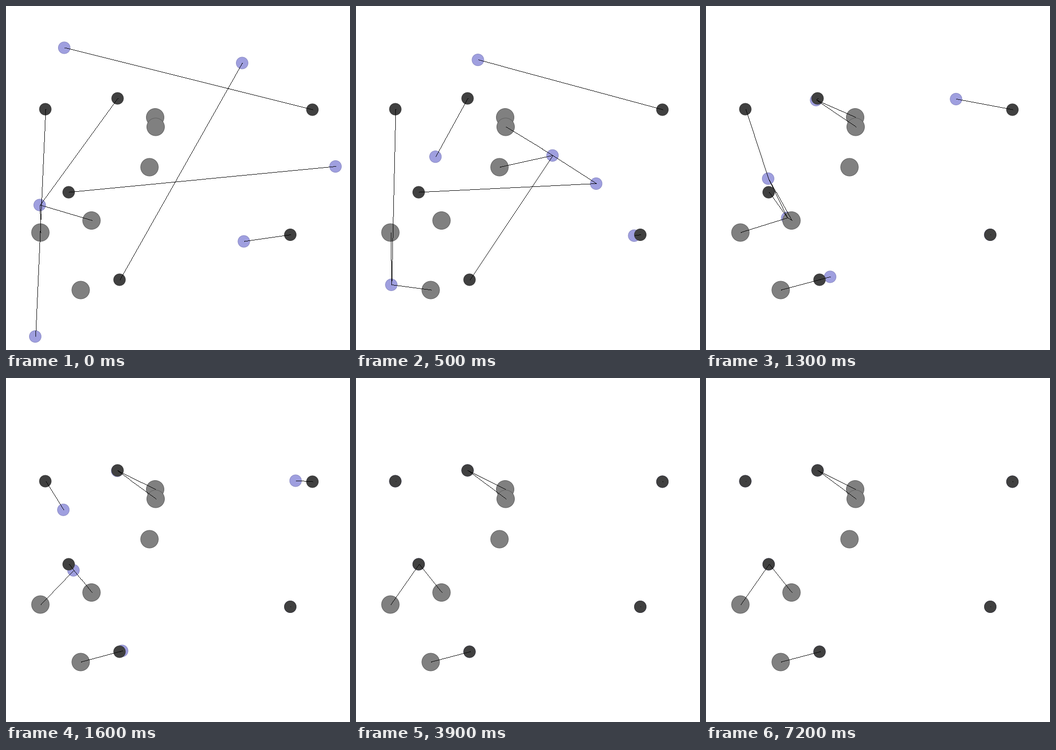
Recreate the animation shown at these times as a matplotlib script. Size 700 by 700 pixels, loop 7.4 s.

```python
import numpy as np
import matplotlib.pyplot as plt
from itertools import combinations
from matplotlib.animation import FuncAnimation
from matplotlib.patches import Circle

SIZE, DPI = 700, 100
FRAMES, STEP = 74, 100      # loop of 7400 ms
PX = 72 / DPI               # one pixel in points
SIGHT = 123                 # neighbours closer than this are linked
PICKUP, ARRIVE = 0.45, 0.36  # easing into cruise speed and onto the goal
BENDS = np.array([0, 0.3, 0.6, 0.9, 1])

# Points are complex numbers: x + y j.
OBSTACLES = [303.5 + 226.5j, 304.5 + 246j, 292 + 328j,
             174 + 436.5j, 70 + 461j, 152 + 578j]

# start, goal, cruise speed per step, sideways swerve at the inner bends
AGENTS = [
    (118.5 + 85j, 623.5 + 211j, 34.3, (-8, 3, 8)),
    (480.5 + 116j, 231 + 557j, 53, (-16, -34, -42)),
    (670.5 + 326.5j, 127.5 + 379j, 48, (-16, -25, -75)),
    (484 + 479j, 578.5 + 465.5j, 45, (0, 0, 0)),
    (68.5 + 405j, 227 + 188j, 35, (13, 18, -2)),
    (59.5 + 672.5j, 80 + 210j, 27.5, (12, 55, 37)),
]


def smooth(x, y, at):
    """Monotone cubic curve through the points (x, y)."""
    gap = np.diff(x)
    slope = np.diff(y) / gap
    tan = np.concatenate([[0], slope[-1:].repeat(len(x) - 1)])
    for i, (a, b) in enumerate(zip(slope, slope[1:]), 1):
        tan[i] = 2 * a * b / (a + b) if a * b > 0 else 0
    i = np.clip(np.searchsorted(x, at, side="right") - 1, 0, len(gap) - 1)
    h = gap[i]
    u = (at - x[i]) / h
    return (y[i] * (1 + 2 * u) * (1 - u) ** 2 + y[i + 1] * u ** 2 * (3 - 2 * u)
            + h * u * (1 - u) * (tan[i] * (1 - u) - tan[i + 1] * u))


def travel(length, speed):
    """Distance covered at each step: speed up, cruise, settle on the goal."""
    done = [0]
    for k in range(1, FRAMES):
        cruise = speed * (1 - (1 - PICKUP) ** k)
        done.append(done[-1] + min(cruise, ARRIVE * (length - done[-1])))
    return np.array(done)


def path(start, goal, speed, swerve):
    length = abs(goal - start)
    heading = (goal - start) / length
    done = travel(length, speed)
    side = smooth(BENDS, np.array([0, *swerve, 0]), done / length)
    return start + heading * (done + 1j * side)


goals = [agent[1] for agent in AGENTS]
paths = np.array([path(*agent) for agent in AGENTS])

fig = plt.figure(figsize=(SIZE / DPI, SIZE / DPI), dpi=DPI, facecolor="white")
ax = fig.add_axes([0, 0, 1, 1])
ax.set_xlim(0, SIZE)
ax.set_ylim(SIZE, 0)
ax.axis("off")


def disc(p, radius, fill, edge, z):
    return ax.add_patch(Circle((p.real, p.imag), radius, facecolor=fill,
                               edgecolor=edge, linewidth=PX, zorder=z))


movers = [disc(p[0], 12, "#9f9fdf", "#8a8ac4", 1) for p in paths]
for spot in OBSTACLES:
    disc(spot, 18, "#808080", "#606060", 2)
for goal in goals:
    disc(goal, 12, "#404040", "#383838", 3)
ink, = ax.plot([], [], ",", color="black", zorder=4)


def pixels(a, b):
    """Centres of the pixels on a hard one-pixel line from a to b."""
    d = b - a
    n = int(max(abs(d.real), abs(d.imag))) + 1
    p = np.linspace(a, b, n + 1)
    return np.floor(p.real) + 0.5 + 1j * (np.floor(p.imag) + 0.5)


def draw(frame):
    spots = paths[:, frame]
    for mover, p in zip(movers, spots):
        mover.center = (p.real, p.imag)
    pairs = [*combinations(spots, 2),
             *((a, o) for a in spots for o in OBSTACLES)]
    lines = [*zip(spots, goals),
             *((a, b) for a, b in pairs if abs(a - b) < SIGHT)]
    dots = np.concatenate([pixels(a, b) for a, b in lines])
    ink.set_data(dots.real, dots.imag)
    return [*movers, ink]


anim = FuncAnimation(fig, draw, frames=FRAMES, interval=STEP, repeat=True,
                     repeat_delay=0, blit=False)
plt.show()
```
